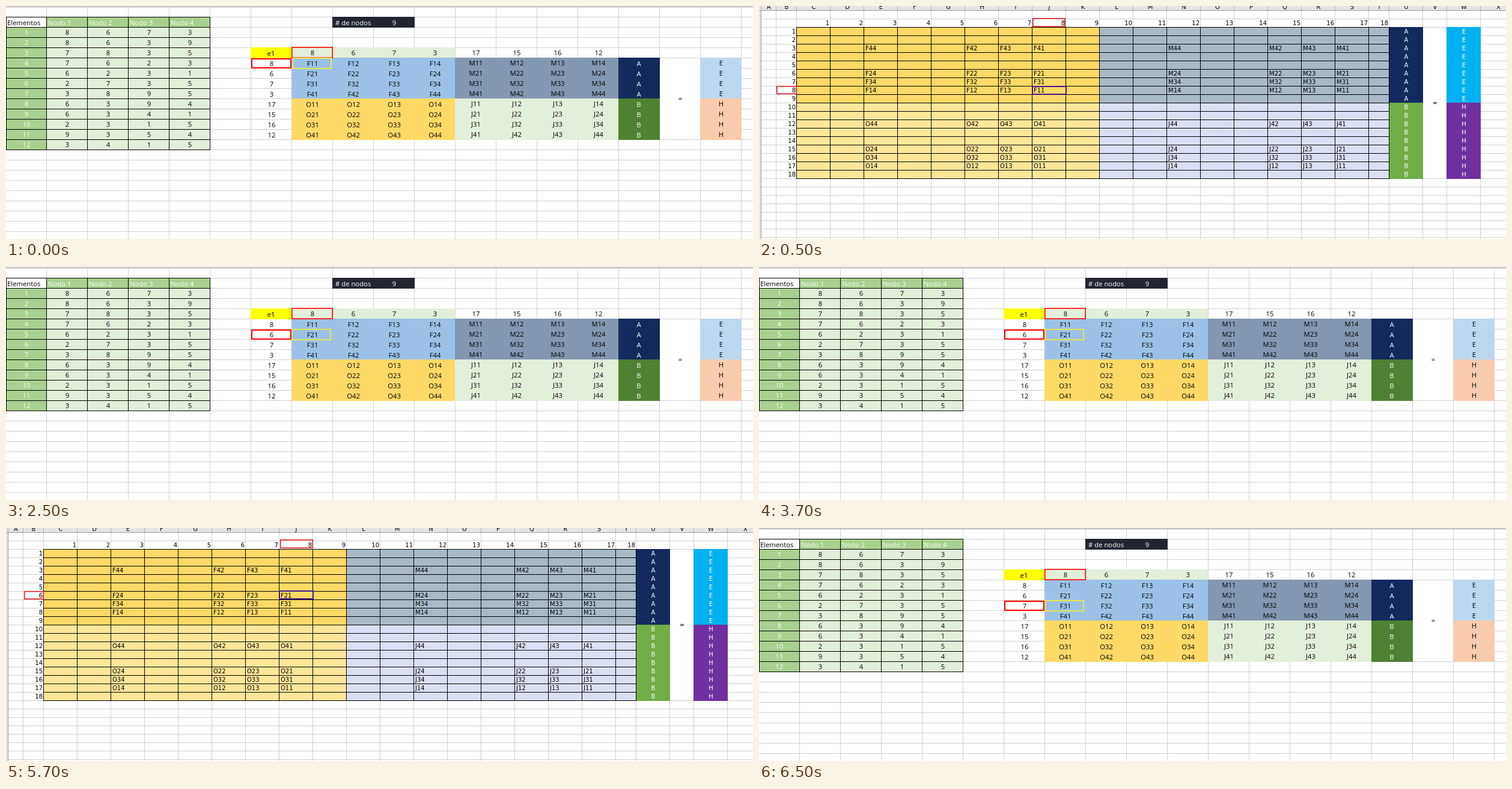
An HTML page with a canvas that plays this animation: 1243 by 388 pixels, repeating every 8 s.

```html
<!DOCTYPE html>
<html lang="es">
<head>
<meta charset="utf-8">
<title>Ensamble de matriz</title>
<style>
html, body { margin: 0; width: 100%; height: 100%; overflow: hidden; background: #fff; }
canvas { display: block; }
</style>
</head>
<body>
<canvas width="1243" height="388"></canvas>
<script>
const W = 1243, H = 388, LOOP = 8000;
const ctx = document.querySelector('canvas').getContext('2d');

const NODES = [8, 6, 7, 3];
const ELEMENTS = ['8673', '8639', '7835', '7623', '6231', '2735',
  '3895', '6394', '6341', '2315', '9354', '3415'];

// Scenes: end time, sheet, row of the highlighted entry
const SCENES = [
  [500, local, 0], [2500, global, 0], [4500, local, 1],
  [6500, global, 1], [LOOP, local, 2]
];

function fill(color, x0, y0, x1, y1) {
  ctx.fillStyle = color;
  ctx.fillRect(x0, y0, x1 - x0, y1 - y0);
}

function frame(color, x0, y0, x1, y1, width = 2) {
  ctx.strokeStyle = color;
  ctx.lineWidth = width;
  const h = width / 2;
  ctx.strokeRect(x0 + h, y0 + h, x1 - x0 - width, y1 - y0 - width);
}

function text(s, x, y, color = '#000', align = 'center') {
  ctx.fillStyle = color;
  ctx.textAlign = align;
  ctx.fillText(s, x, y + 4);
}

function grid(color, xs, ys, x0, y0, x1, y1) {
  for (const x of xs) fill(color, x, y0, x + 1, y1);
  for (const y of ys) fill(color, x0, y, x1, y + 1);
}

const steps = (start, step, count) => Array.from({length: count}, (_, i) => start + i * step);

function clear() {
  fill('#fff', 0, 0, W, H);
}

function local(active) {
  const col = k => 67 + 68 * k, row = k => 18 + 17 * k;
  clear();
  ctx.font = '11.3px "Open Sans", "Noto Sans", sans-serif';
  grid('#d2d2d2', steps(67, 68, 18), steps(18, 17, 22), 0, 2, W, H);
  fill('#e6e6e6', 0, 0, W, 1);
  fill('#9a9a9a', 0, 1, W, 2);

  // Element table
  fill('#fff', 0, 18, 67, 35);
  fill('#a9d08e', 67, 18, 339, 35);
  fill('#a9d08e', 0, 35, 67, 239);
  fill('#e2efda', 67, 35, 339, 239);
  grid('#000', [0, ...steps(67, 68, 5)], steps(18, 17, 14), 0, 18, 340, 240);
  text('Elementos', 2, 28, '#000', 'left');
  for (let j = 0; j < 4; j++) text('Nodo ' + (j + 1), col(j) + 3, 28, '#fff', 'left');
  ELEMENTS.forEach((nodes, i) => {
    const y = row(i + 1) + 9;
    text(i + 1, 34, y, '#fff');
    [...nodes].forEach((n, j) => text(n, col(j) + 35, y));
  });

  fill('#222631', 543, 18, 680, 36);
  text('# de nodos', 548, 28, '#fff', 'left');
  text('9', 646, 28, '#fff');

  // Element matrix
  fill('#ff0', 407, 69, 475, 87);
  fill('#e2efda', 475, 69, 747, 86);
  fill('#9bc2e6', 475, 86, 747, 154);
  fill('#8497b0', 747, 86, 1019, 154);
  fill('#ffd966', 475, 154, 747, 223);
  fill('#e2efda', 747, 154, 1019, 223);
  fill('#142a5e', 1019, 86, 1088, 154);
  fill('#4f8132', 1019, 154, 1088, 223);
  fill('#fff', 1088, 87, 1155, 222);
  fill('#bdd7ee', 1155, 86, 1224, 154);
  fill('#f8cbad', 1155, 154, 1224, 223);
  text('e1', 441, 79);
  text('=', 1122, 154);
  const labels = [...NODES, ...NODES.map(n => n + 9)];
  labels.forEach((n, i) => {
    const y = row(4 + i) + 10, low = i > 3;
    text(n, col(6) + 35, 78 - 68 * 0, '#000');
    text(n, 442, y);
    for (let j = 0; j < 8; j++) {
      const name = (low ? 'OJ' : 'FM')[j >> 2];
      text(name + (i % 4 + 1) + (j % 4 + 1), col(6 + j) + 35, y - (j > 3));
    }
    text(low ? 'B' : 'A', 1053, y, '#fff');
    text(low ? 'H' : 'E', 1190, y - 1);
  });
  fill('#e2efda', 475, 69, 543, 86);
  labels.forEach((n, j) => text(n, col(6 + j) + 35, 78));

  const y = row(4 + active);
  frame('#f00', 475, 68, 544, 87, 1.6);
  frame('#f00', 408, y + 1, 475, y + 18);
  frame('#f5ee30', active ? 475 : 477, y, active ? 541 : 542, y + 19, 1.6);
}

function global(active) {
  const col = k => 62 + 56 * (k - 1), row = k => 35 + 14 * (k - 1);
  const edges = [...steps(62, 56, 18), 1048];
  const columns = [3, 28, ...edges, 1104, 1144, 1200];
  clear();
  ctx.font = '10px "DejaVu Sans", sans-serif';
  grid('#d0d0d0', columns, steps(21, 14, 27), 3, 7, W, H);

  // Sheet headings
  fill('#e4e4e4', 0, 0, W, 7);
  fill('#e4e4e4', 0, 0, 3, H);
  fill('#9c9c9c', 0, 7, W, 8);
  fill('#9c9c9c', 3, 0, 4, H);
  columns.forEach((x, i) => {
    fill('#b0b0b0', x, 0, x + 1, 7);
    const next = columns[i + 1] || 1259;
    text(String.fromCharCode(65 + i), (x + next) / 2 + 1, 0.5);
  });

  // Global matrix
  fill('#ffd966', 62, 35, 566, 161);
  fill('#a9b9c7', 566, 35, 1048, 161);
  fill('#ffe699', 62, 161, 566, 287);
  fill('#dadff3', 566, 161, 1048, 287);
  grid('#000', edges, steps(35, 14, 19), 62, 35, 1049, 288);
  fill('#142a5e', 1049, 35, 1105, 161);
  fill('#70ad47', 1049, 161, 1105, 288);
  fill('#fff', 1105, 36, 1144, 287);
  fill('#00b0f0', 1144, 35, 1201, 161);
  fill('#7030a0', 1144, 161, 1201, 288);
  text('=', 1125, 161);
  for (let k = 1; k <= 18; k++) {
    const y = row(k) + 7, low = k > 9;
    text(k, edges[k] - 1, 28, '#000', 'right');
    text(k, 61, y, '#000', 'right');
    text(low ? 'B' : 'A', 1077, y, '#fff');
    text(low ? 'H' : 'E', 1173, y, '#fff');
  }
  NODES.forEach((r, i) => NODES.forEach((c, j) => {
    [...'FMOJ'].forEach((name, q) => {
      const x = col(c + 9 * (q % 2)), y = row(r + 9 * (q >> 1));
      text(name + (i + 1) + (j + 1), x + 3, y + 7, '#000', 'left');
    });
  }));

  const y = row(NODES[active]);
  frame('#e8101c', 455 + active, 20 - active, 510 + active, 35 - active, 1.5);
  frame('#e8101c', 29 + active, y, 63, y + 14, 1.5);
  frame('#45128f', 454, y - active, 512, y + 15 - active);
}

function draw() {
  const t = performance.now() % LOOP;
  const [, sheet, active] = SCENES.find(s => t < s[0]);
  sheet(active);
  requestAnimationFrame(draw);
}
draw();
</script>
</body>
</html>
```
